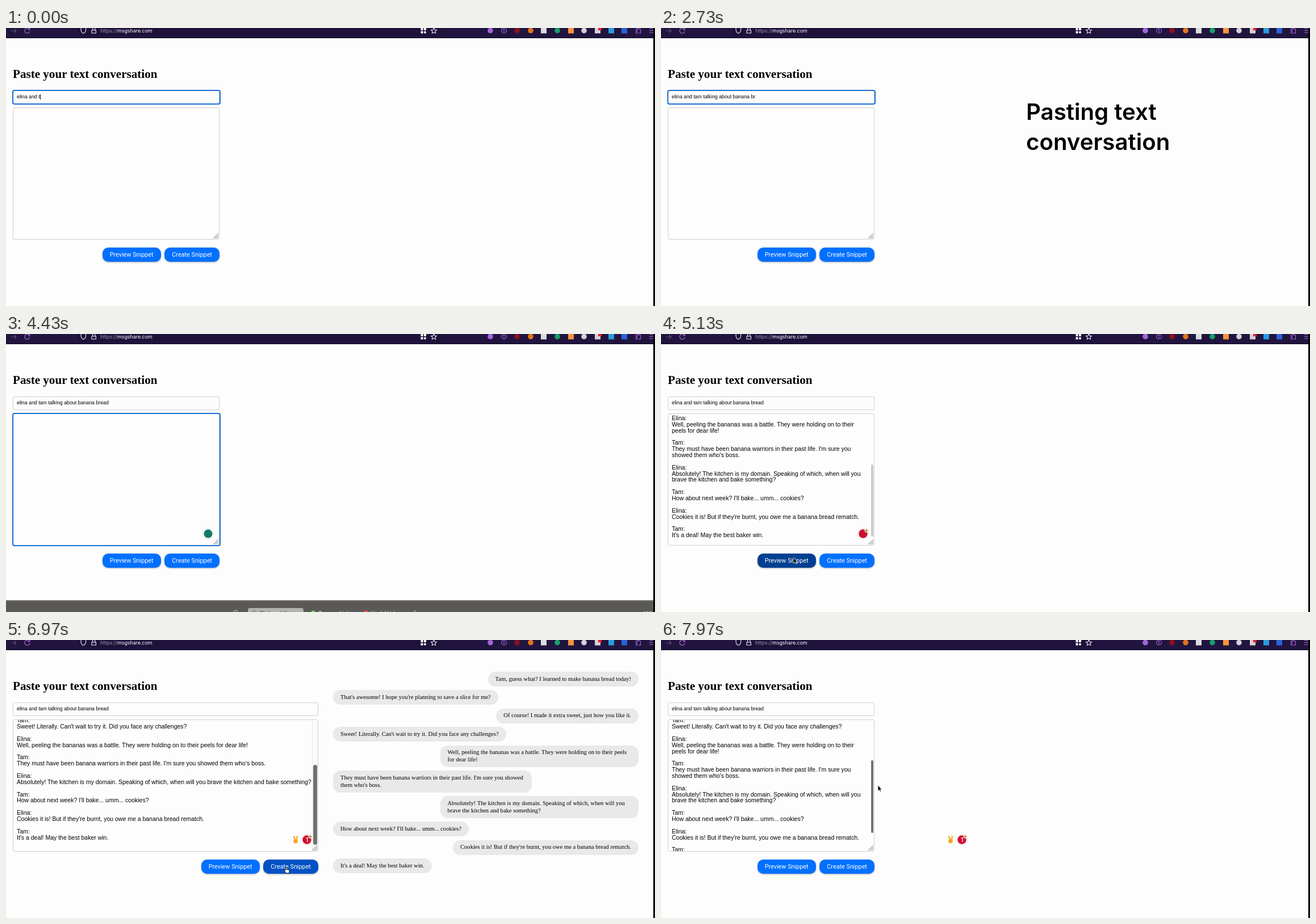
Recreate the animation shown at these times as an HTML page. Size 1143 by 490 pixels, loop 8000 ms.

```html
<!DOCTYPE html>
<html lang="en">
<head>
<meta charset="utf-8">
<title>Text conversation snippet</title>
<style>
* { box-sizing: border-box; }
html, body { margin: 0; width: 100%; height: 100%; overflow: hidden; }
body { position: relative; background: #fdfdfd; color: #000; }
svg { position: absolute; overflow: visible; }
.abs, .ring, .field { position: absolute; }

/* Every timed part shares one 8 s clock: 1% = 80 ms */
.timed { animation: 8s step-end infinite; }

#bar { left: 0; top: 0; }
#edge { left: 1140px; top: 0; width: 3px; height: 490px; background: #000; }

#form { left: 12px; top: 0; width: 364px; height: 420px; animation-name: widen; }
@keyframes widen { 0%, 98.2%, 100% { width: 364px; } 65.6% { width: 538px; } }
h1 {
  position: absolute; left: 0; top: 69px; margin: 0; white-space: nowrap;
  font: bold 21.1px/24px "Liberation Serif", "Times New Roman", serif;
}
.field {
  left: 0; width: 100%; background: #fff0; border: 1px solid #cfcfd2; border-radius: 3px;
  font-family: "Liberation Sans", Arial, sans-serif;
}
#name { top: 110px; height: 24px; padding-left: 6px; font-size: 8.8px; line-height: 20px; white-space: pre; }
#caret { display: inline-block; width: 1px; height: 9px; background: #000; vertical-align: -2px; }
#area { top: 140px; height: 233px; overflow: hidden; }
.ring { left: -1.5px; right: -1.5px; border: 2px solid #1a6fd6; border-radius: 4px; visibility: hidden; }
#nameRing { top: 108.5px; height: 26px; animation-name: nameFocus; }
#areaRing { top: 139px; height: 235px; animation-name: areaFocus; }
@keyframes nameFocus { 0% { visibility: visible; } 40%, 100% { visibility: hidden; } }
@keyframes areaFocus { 0%, 63.5%, 100% { visibility: hidden; } 40% { visibility: visible; } }

#pasted { inset: 0; visibility: hidden; animation-name: paste; }
@keyframes paste { 0% { visibility: hidden; } 57.5%, 100% { visibility: visible; } }
#text {
  left: 6px; right: 12px; bottom: 12px; white-space: pre-line;
  font-size: 10.5px; line-height: 10.86px; animation-name: scroll;
}
@keyframes scroll {
  0% { bottom: 12px; right: 12px; }
  65.6% { bottom: 18.6px; right: 2px; }
  98.2%, 100% { bottom: -14px; right: 12px; }
}
#track {
  right: 0; top: 0; bottom: 0; width: 10px; background: #fafafa; border-left: 1px solid #e8e8e8;
  visibility: hidden; animation-name: track;
}
@keyframes track { 0%, 98.2%, 100% { visibility: hidden; } 76.9% { visibility: visible; } }
#thumb { right: 1px; border-radius: 4px; animation-name: thumb; }
@keyframes thumb {
  0% { top: 89px; height: 127px; width: 4px; background: #c9c9c9; }
  65.6% { top: 79px; height: 141px; width: 4px; background: #707070; }
  76.9% { top: 79px; height: 141px; width: 7px; background: #707070; }
  98.2%, 100% { top: 71px; height: 128px; width: 4px; background: #707070; }
}
#grip { right: 2px; top: 362px; }

#buttons { right: 0; top: 386.5px; display: flex; gap: 6.5px; }
#buttons span {
  height: 25.5px; padding: 0 13.1px; border-radius: 10px; background: #0070ff; color: #fff;
  font: 10.82px/25.5px Roboto, sans-serif; white-space: nowrap; box-shadow: 0 1px 3px #0005;
}
#previewBtn { animation-name: press; }
#createBtn { animation-name: hover; }
@keyframes press {
  0%, 65.6%, 100% { background: #0070ff; }
  62.2% { background: #0055c8; }
  63.5% { background: #003f92; }
}
@keyframes hover { 0%, 91%, 100% { background: #0070ff; } 83.8% { background: #0052c4; } }

#chat {
  left: 576px; top: 56px; width: 538px; display: flex; flex-direction: column; gap: 6.6px;
  align-items: flex-start; visibility: hidden; animation-name: preview;
}
@keyframes preview { 0%, 98.2%, 100% { visibility: hidden; } 65.6% { visibility: visible; } }
#chat div {
  max-width: 349.5px; padding: 6.6px 13px; border-radius: 13px; background: #e9e9ea;
  font: 10.56px/12.6px "Liberation Serif", "Times New Roman", serif;
}
#chat div:nth-child(odd) { align-self: flex-end; }

#caption {
  left: 643px; top: 121px; font: 600 40.2px/53px Inter, sans-serif; white-space: pre;
  opacity: 0; animation: caption 8s linear infinite;
}
@keyframes caption { 0%, 10.5% { opacity: 0; } 14%, 40% { opacity: 1; } 42.5%, 100% { opacity: 0; } }

#badge { left: 356px; top: 352px; animation-name: badge; }
@keyframes badge { 0% { left: 356px; } 67.5%, 100% { left: 530px; } }
#ready, #alert, #count { visibility: hidden; }
#ready { animation-name: ready; }
#alert { animation-name: alert; }
#count { animation-name: count; }
@keyframes ready { 0%, 60.5%, 100% { visibility: hidden; } 41.5% { visibility: visible; } }
@keyframes alert { 0% { visibility: hidden; } 60.5%, 100% { visibility: visible; } }
@keyframes count { 0% { visibility: hidden; } 71%, 100% { visibility: visible; } }

#panel { left: 0; top: 433px; transform: translateY(60px); animation: panel 8s ease-out infinite; }
@keyframes panel {
  0%, 43.2% { transform: translateY(60px); }
  46.5%, 54.2% { transform: none; }
  57%, 100% { transform: translateY(60px); }
}
#panel text { font: 8.45px Inter, sans-serif; fill: #fff; }

#cursor { left: 0; top: 0; animation: move 8s ease-in-out infinite; }
@keyframes move {
  0%, 59.4% { transform: translate(300px, 330px); opacity: 0; }
  59.5% { transform: translate(300px, 330px); opacity: 1; }
  62.8%, 65.5% { transform: translate(233px, 394px); }
  68.2% { transform: translate(310px, 428px); }
  73%, 79% { transform: translate(541px, 308px); }
  85%, 90% { transform: translate(492px, 400px); }
  97.2%, 100% { transform: translate(382px, 256px); opacity: 1; }
}
#arrow { animation-name: arrow; }
#hand { visibility: hidden; animation-name: hand; }
@keyframes arrow { 0%, 91%, 100% { visibility: visible; } 83.8% { visibility: hidden; } }
@keyframes hand { 0%, 91%, 100% { visibility: hidden; } 83.8% { visibility: visible; } }
</style>
</head>
<body>
<svg id="bar" width="1140" height="18">
  <rect width="1140" height="18" fill="#21153f"/>
  <rect x="126" width="640" height="14" fill="#1e123b"/>
  <rect y="16.5" width="1140" height="1.5" fill="#150c2c"/>
  <g fill="none" stroke-width="1.1">
    <path d="M9 5h9M14.5 1.5 18 5l-3.500 3.500" stroke="#5d5278"/>
    <path d="M41 2a4.500 4.500 0 1 0 .8 4M42 0v3h-3.500" stroke="#b36be0"/>
    <path d="M132 0v3q0 4.500 4.300 6.500Q140.600 7.500 140.600 3V0" stroke="#ece8f5"/>
    <path d="M152.500 4V1.500a2.200 2.200 0 0 1 4.400 0V4M151 4h7.400v5H151z" stroke="#ece8f5"/>
    <path d="m753.500 0 1.500 3 3.400.4-2.500 2.400.7 3.500-3.100-1.700-3.100 1.700.7-3.500-2.500-2.400 3.400-.4z" stroke="#ece8f5"/>
    <circle cx="877" cy="4.500" r="4.500" stroke="#a566d8"/>
    <path d="M1109.500 2h2.500V.5h2.500V2h3v7h-8V6.500h2v-2h-2zM1133 1h7M1133 4.500h7M1133 8h7" stroke="#a566d8"/>
  </g>
  <path d="M874.500 7q2.500-2.500 5 0M875.700 3a1.300 1.300 0 1 0 2.600 0 1.300 1.300 0 1 0-2.600 0" fill="#a566d8"/>
  <path d="M730.500 0h4v4h-4zM736 0h4v4h-4zM730.500 5.500h4v4h-4zM737 5.500h2v4h-2zM736 6.500h4v2h-4z" fill="#fff"/>
  <g id="addons"></g>
  <text x="166" y="8" font-family="Inter, sans-serif" font-size="8.85" fill="#9d96ae">https://<tspan fill="#fff">msgshare.com</tspan></text>
</svg>

<div id="form" class="abs timed">
  <h1>Paste your text conversation</h1>
  <div id="name" class="field"><span id="typed"></span><i id="caret"></i></div>
  <div id="area" class="field">
    <div id="pasted" class="abs timed">
      <div id="text" class="abs timed"></div>
      <div id="track" class="abs timed"></div>
      <div id="thumb" class="abs timed"></div>
    </div>
  </div>
  <div id="nameRing" class="ring timed"></div>
  <div id="areaRing" class="ring timed"></div>
  <svg id="grip" width="9" height="9"><path d="M0 9 9 0M3 9 9 3M6 9 9 6" stroke="#777" stroke-width="1"/></svg>
  <div id="buttons" class="abs"><span id="previewBtn" class="timed">Preview Snippet</span><span id="createBtn" class="timed">Create Snippet</span></div>
</div>

<div id="chat" class="abs timed"></div>
<div id="caption" class="abs">Pasting text
conversation</div>

<svg id="badge" class="timed" width="1" height="1">
  <g id="ready" class="timed">
    <circle r="9.500" fill="#fff" stroke="#ddd"/>
    <circle r="7.500" fill="#0f7b68"/>
  </g>
  <g id="alert" class="timed">
    <circle r="9.500" fill="#fff" stroke="#ddd"/>
    <circle r="7.700" fill="#cf0f2e"/>
    <path d="M6-9v7M2.500-5.500h7" stroke="#fff" stroke-width="3.500"/>
    <path d="M6-8.500v6M3-5.500h6" stroke="#b8892b" stroke-width="1.600"/>
  </g>
  <g id="count" class="timed">
    <text y="3.500" text-anchor="middle" font-family="Inter, sans-serif" font-size="10" font-weight="600" fill="#fff">1</text>
    <g stroke="#f5ae2e" stroke-linecap="round" stroke-width="2.600">
      <path d="m-20.500 0-2.500-5.500M-18.500 0l1.500-5.500"/>
      <rect x="-22.500" y="0" width="5" height="5" rx="1.500" fill="#f5ae2e"/>
    </g>
    <path d="M-22.500 2.500h4" stroke="#c97f12" stroke-width=".8"/>
  </g>
</svg>

<svg id="panel" width="1140" height="57">
  <rect width="1140" height="57" fill="#5b5957"/>
  <rect width="1140" height="1.500" fill="#8b8985"/>
  <g fill="none" stroke="#e4e2e0" stroke-width="1">
    <circle cx="404.500" cy="21" r="3"/>
    <path d="m407 23.500 2.500 2.500M716 22h8M720 18v8"/>
    <circle cx="1125" cy="22.500" r="2"/><circle cx="1130" cy="22.500" r="2"/><circle cx="1135" cy="22.500" r="2"/>
  </g>
  <rect x="426" y="14" width="98" height="17" rx="4" fill="#b3b1af"/>
  <circle cx="437" cy="22.500" r="4" fill="#9a9896" stroke="#858381"/>
  <circle cx="541" cy="22.500" r="4" fill="#6cd552"/>
  <circle cx="634" cy="22.500" r="4" fill="#ff4d48"/>
  <text x="446" y="25.600" style="fill:#333">Clipboard History</text>
  <text x="550" y="25.600">Common Links</text>
  <text x="643" y="25.600">Useful Links</text>
  <g id="cards"></g>
</svg>

<svg id="cursor" width="12" height="14">
  <path id="arrow" class="timed" d="M0 0V10L2.300 8 3.800 11.400 5.500 10.700 4 7.400H7Z" fill="#000" stroke="#fff" stroke-width=".7"/>
  <path id="hand" class="timed" d="M0 1q1-1.500 2 0v3.500q3-.5 5 1V8q0 2-1 3H1.500Q0 9-2 6.500-1.500 5 0 6.500Z" fill="#fff" stroke="#000" stroke-width=".9"/>
</svg>
<div id="edge" class="abs"></div>

<script>
const LOOP = 8000;
const $ = id => document.getElementById(id);

const names = ["Elina", "Tam"];
const lines = [
  "Tam, guess what? I learned to make banana bread today!",
  "That's awesome! I hope you're planning to save a slice for me?",
  "Of course! I made it extra sweet, just how you like it.",
  "Sweet! Literally. Can't wait to try it. Did you face any challenges?",
  "Well, peeling the bananas was a battle. They were holding on to their peels for dear life!",
  "They must have been banana warriors in their past life. I'm sure you showed them who's boss.",
  "Absolutely! The kitchen is my domain. Speaking of which, when will you brave the kitchen and bake something?",
  "How about next week? I'll bake... umm... cookies?",
  "Cookies it is! But if they're burnt, you owe me a banana bread rematch.",
  "It's a deal! May the best baker win."
];
$("text").textContent = lines.map((s, i) => names[i % 2] + ":\n" + s).join("\n\n");
for (const s of lines) {
  const bubble = document.createElement("div");
  bubble.textContent = s;
  $("chat").append(bubble);
}

const dot = (x, y, r, fill) => `<circle cx="${x}" cy="${y}" r="${r}" fill="${fill}"/>`;
const box = (x, y, w, h, fill, more = "") =>
  `<rect x="${x}" y="${y}" width="${w}" height="${h}" fill="${fill}" ${more}/>`;

$("addons").innerHTML =
  [[853, "#a566d8"], [900, "#8d1022"], [924, "#e2761b"], [971, "#15a06e"], [1018, "#d5d2dc"]]
    .map(([x, c]) => dot(x, 4.5, 4.8, c)).join("") +
  [[947, "#d9dedd"], [995, "#f7933c"], [1042, "#d8cfd2"], [1066, "#2a9bdc"], [1089, "#2a62d9"]]
    .map(([x, c]) => box(x - 5, 0, 10, 9.5, c)).join("") +
  box(1043, 0, 6, 4, "#e0202c");

// Clipboard cards: header colour plus a plain app mark
const yellow = ["#fdd73a", "#f47b2a"], green = ["#1fcf58", "#000"], blue = ["#1f9cf0", "#0b74c6"];
$("cards").innerHTML = [yellow, yellow, yellow, green, blue, blue].map(([bg, mark], i) => {
  const x = -7 + i * 193.4;
  const outline = i ? "" : box(x - 2.5, 44.5, 183.5, 60, "#2f73e0", 'rx="4"');
  const logo = i > 3 ? box(x + 122, 47, 50, 50, mark) : dot(x + 150, 74, 22, mark);
  return outline + box(x, 47, 178.5, 60, bg, 'rx="2"') + logo;
}).join("");

const title = "elina and tam talking about banana bread";
function frame() {
  const t = performance.now() % LOOP;
  $("typed").textContent = title.slice(0, 11 + Math.floor(t / 103));
  $("caret").style.opacity = t < 3200 && t % 1000 < 500 ? 1 : 0;
  requestAnimationFrame(frame);
}
frame();
</script>
</body>
</html>
```
